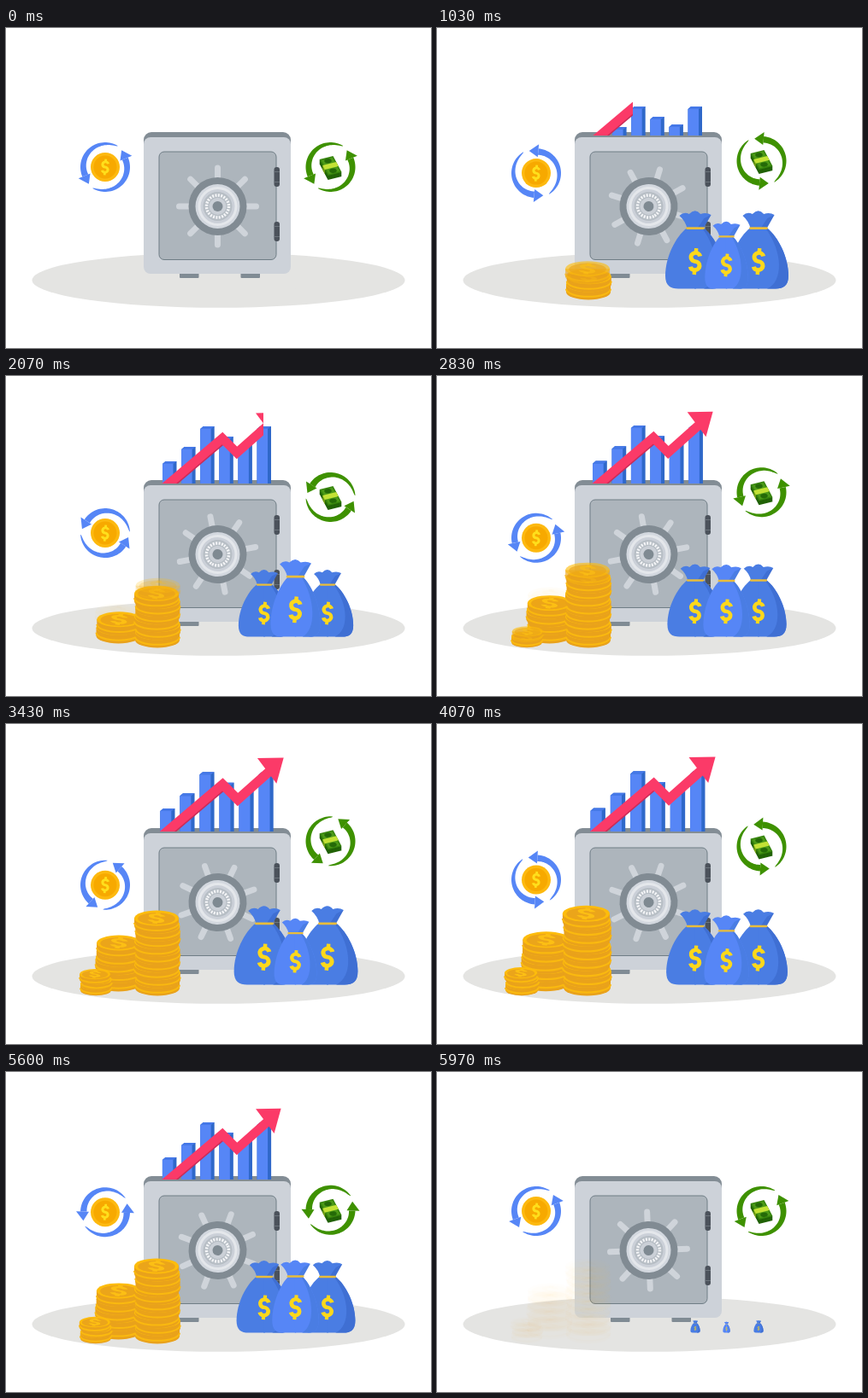
An HTML page with a canvas for the animation above (6010 ms loop, 497 by 375 pixels).

```html
<!DOCTYPE html>
<html lang="en">
<head>
<meta charset="utf-8">
<title>Savings safe</title>
<style>
html, body { margin: 0; width: 100%; height: 100%; overflow: hidden; background: #fff; }
canvas { display: block; }
</style>
</head>
<body>
<canvas id="stage" width="497" height="375"></canvas>
<script>
const ctx = document.getElementById('stage').getContext('2d');
const LOOP = 6010, TAU = Math.PI * 2;
const BLUE = '#5686f6', NAVY = '#4a7de3', GREEN = '#3e9100';

const ramp = (t, a, b) => Math.max(0, Math.min(1, (t - a) / (b - a)));
const wave = turns => (1 + Math.cos(TAU * turns)) / 2;
// Smooth rise and fall around a centre time.
const bump = (t, mid, half) => Math.abs(t - mid) < half ? wave((t - mid) / half / 2) : 0;

function at(x, y, draw, { sx = 1, sy = sx, turn = 0, alpha = 1 } = {}) {
  ctx.save();
  ctx.globalAlpha *= alpha;
  ctx.translate(x, y);
  ctx.rotate(turn);
  ctx.scale(sx, sy);
  draw();
  ctx.restore();
}

function fill(color, trace) {
  ctx.beginPath();
  trace();
  ctx.fillStyle = color;
  ctx.fill();
}

function stroke(color, width, trace) {
  ctx.beginPath();
  trace();
  ctx.strokeStyle = color;
  ctx.lineWidth = width;
  ctx.stroke();
}

const oval = (x, y, rx, ry, color) => fill(color, () => ctx.ellipse(x, y, rx, ry, 0, 0, TAU));
const disc = (r, color) => oval(0, 0, r, r, color);
const box = (x, y, w, h, r, color) => fill(color, () => ctx.roundRect(x, y, w, h, r));
const line = points => points.forEach(([x, y]) => ctx.lineTo(x, y));
const poly = (points, color) => fill(color, () => line(points));

function dollar(x, y, size, color) {
  at(x, y, () => {
    stroke(color, 4.6, () => {
      ctx.arc(0, -4.9, 4.9, -0.3, Math.PI / 2, true);
      ctx.arc(0, 4.9, 4.9, -Math.PI / 2, Math.PI - 0.3);
    });
    box(-2, -15, 4, 6, 0, color);
    box(-2, 9, 4, 6, 0, color);
  }, { sx: size / 28, sy: size / 30, turn: 0.08 });
}

function safe(t) {
  for (const x of [203, 274.5]) box(x, 284, 22.5, 9, 1, '#808b94');
  box(161, 122, 172, 40, 9, '#838d95');
  box(161, 128, 172, 160, 8, '#cdd2d9');
  box(179, 145, 137, 126.5, 6, '#adb5bc');
  stroke('#6f7d85', 1, () => ctx.roundRect(179, 145, 137, 126.5, 6));
  for (const y of [163, 227]) {
    box(313.5, y, 6.5, 23, 3, '#4b525b');
    for (const dy of [5, 17]) box(313.5, y + dy, 6.5, 1, 0, '#6c747c');
  }
  at(247.5, 209, () => {
    ctx.lineCap = 'round';
    for (let i = 0; i < 8; i++)
      at(0, 0, () => stroke('#cfd4da', 7, () => line([[32, 0], [45, 0]])), { turn: i * TAU / 8 });
    ctx.lineCap = 'butt';
    disc(34, '#818b93');
    disc(26, '#d3d8df');
    disc(23, '#e4e7eb');
    disc(20, '#cbd0d8');
    disc(17, '#b7bec5');
    ctx.setLineDash([2, 1.4]);
    stroke('#f4f5f7', 3.5, () => ctx.arc(0, 0, 13, 0, TAU));
    ctx.setLineDash([]);
    disc(10, '#cbd0d7');
    disc(6, '#7f8a92');
  }, { turn: TAU * t / LOOP });
}

function cycleArrows(x, y, turn, color) {
  const ray = (a, r) => [Math.cos(a) * r, Math.sin(a) * r];
  const tail = 2.1, neck = -0.4, steps = 36;
  const outer = [], inner = [];
  for (let i = 0; i <= steps; i++) {
    const p = i / steps, a = tail + (neck - tail) * p;
    outer.push(ray(a, 29));
    inner.unshift(ray(a, 28.5 - 7 * p ** 0.6));
  }
  for (const half of [0, Math.PI]) at(x, y, () => {
    poly([...outer, ...inner], color);
    poly([ray(neck, 34), ray(neck * 2, 27.5), ray(neck, 19)], color);
  }, { turn: turn + half });
}

function goldCoin(x, y) {
  at(x, y, () => {
    disc(17, '#fdb90f');
    disc(13.5, '#f7a900');
    dollar(0, 0, 19, '#ffdf1c');
  });
}

function cash(x, y) {
  for (let lift = 5; lift >= 0; lift--) at(x, y + lift, () => {
    // Unit square laid on a slanted plane.
    ctx.transform(16, -4, 10, 19, -13, -9);
    box(0, 0, 1, 1, 0, lift ? '#226307' : '#37850d');
    if (!lift) {
      box(0.1, 0.07, 0.8, 0.86, 0, '#4c9a18');
      for (const v of [0.2, 0.8]) oval(0.5, v, 0.25, 0.13, '#256a08');
    }
    box(0, 0.37, 1, 0.26, 0, lift ? '#94b91d' : '#c3e236');
  });
}

const barHeights = [26, 43, 67, 55, 46, 67];

function chart(t) {
  const drop = 67 * (1 - ramp(t, 40, 2000));
  at(246.5, 126, () => {
    ctx.translate(-246.5, -126);
    ctx.beginPath();
    ctx.rect(0, 0, 497, 126);
    ctx.clip();
    barHeights.forEach((h, i) => at(183 + 22.1 * i, 126 - h + drop, () => {
      poly([[0, 3], [3.5, 0], [16.5, 0], [16.5, 70], [0, 70]], '#2f68c9');
      poly([[0, 3], [3.5, 0], [16.5, 0], [12.5, 3]], '#4578e8');
      box(0, 3, 12.5, 70, 0, BLUE);
    }));
    ctx.beginPath();
    ctx.rect(0, 0, 229 + (t - 1030) * 0.0692, 126);
    ctx.clip();
    const path = [[183, 132.5], [253, 73], [270, 90], [307, 57]];
    at(0, 2, () => stroke('#c92c58', 10.7, () => line(path.slice(0, 2))));
    stroke('#fb3a68', 10.7, () => line(path));
    poly([[292, 43.5], [321.5, 43], [313.5, 72]], '#fb3a68');
  }, { sx: 1 + 0.055 * bump(t, 4000, 1800), alpha: 1 - ramp(t, 5710, 5955) });
}

function flatCoin(x, y, rx, ry, h) {
  oval(x, y, rx, ry, '#e9a21b');
  box(x - rx, y - h, 2 * rx, h, 0, '#e9a21b');
  stroke('#fab90f', 2, () => ctx.ellipse(x, y - h * 0.4, rx, ry, 0, 0, Math.PI));
  oval(x, y - h, rx, ry, '#fdbc0c');
  oval(x, y - h + 0.4, rx * 0.84, ry * 0.78, '#eba51a');
  at(x, y - h, () => dollar(0, 0, rx, '#fcbf14'), { sx: 1.5, sy: 0.5, turn: 0.1 });
}

const stacks = [
  { x: 131.5, y: 304.5, r: 26, h: 9.6, count: 5, start: 1300, gap: 380 },
  { x: 177, y: 309.5, r: 26, h: 9.1, count: 9, start: 180, gap: 300 },
  { x: 105, y: 312, r: 18, h: 6.3, count: 3, start: 2100, gap: 480 }
];

function coins(t) {
  at(203, 318, () => {
    for (const { x, y, r, h, count, start, gap } of stacks)
      for (let i = 0; i < count; i++) {
        const shown = ramp(t - start - i * gap, 0, 400);
        if (shown) at(x - 203 + Math.sin(i * 2.2), y - 318 - i * h,
          () => flatCoin(0, 0, r, r * 0.345, h), { alpha: shown });
      }
  }, { sx: 1 + 0.095 * bump(t, 4550, 1150), alpha: 1 - ramp(t, 5710, 5974) });
}

// Right half of the body; the left half mirrors it.
function halfBody() {
  ctx.moveTo(0, -69);
  ctx.lineTo(10, -69);
  ctx.bezierCurveTo(23, -59, 35, -36, 35, -15);
  ctx.bezierCurveTo(35, -3, 29, 0, 20, 0);
}

function bag(x, scale, widen, color, shade) {
  at(x, 305.5, () => {
    for (const side of [-widen, widen]) at(0, 0, () => fill(color, () => {
      halfBody();
      ctx.lineTo(-1, 0);
      ctx.lineTo(-1, -69);
    }), { sx: side, sy: 1 });
    at(0, 0, () => fill(shade, () => {
      halfBody();
      ctx.lineTo(10, 0);
      ctx.bezierCurveTo(29, -8, 29, -42, 8, -69);
    }), { sx: widen, sy: 1 });
    fill(color, () => {
      ctx.moveTo(-9, -68);
      ctx.quadraticCurveTo(-11, -77, -18, -83);
      ctx.quadraticCurveTo(-13, -88, -7, -85);
      ctx.quadraticCurveTo(0, -92, 6, -85);
      ctx.quadraticCurveTo(13, -87, 18, -84);
      ctx.quadraticCurveTo(11, -77, 9, -68);
    });
    poly([[2, -68], [10, -80], [18, -84], [9, -68]], shade);
    box(-10.5, -70, 21, 2.6, 1.3, '#e9bd3b');
    dollar(0, -31, 30, '#fdd81b');
  }, { sx: scale });
}

function bags(t) {
  const size = ramp(t, 0, 650) * (1 - ramp(t, 5770, LOOP));
  if (!size) return;
  const sway = wave((t - 760) / 2800);
  for (const x of [302, 376]) bag(x, size * (0.885 + 0.16 * sway), 0.97, NAVY, '#3f6fd3');
  bag(338.5, size * (1.025 - 0.15 * sway), 0.81, BLUE, NAVY);
}

function frame(t) {
  const bob = 13.5 * Math.cos(TAU * t / LOOP);
  const turn = -TAU * t / LOOP;
  ctx.fillStyle = '#fff';
  ctx.fillRect(0, 0, 497, 375);
  oval(248.5, 295.5, 218, 32.3, '#e4e4e2');
  safe(t);
  chart(t);
  cycleArrows(116, 176.5 - bob, turn, BLUE);
  goldCoin(116, 176.5 - bob);
  cycleArrows(379.5, 149.5 + bob, turn, GREEN);
  cash(379.5, 149.5 + bob);
  coins(t);
  bags(t);
}

const begin = performance.now();
function tick() {
  frame((performance.now() - begin) % LOOP);
  requestAnimationFrame(tick);
}
tick();
</script>
</body>
</html>
```
